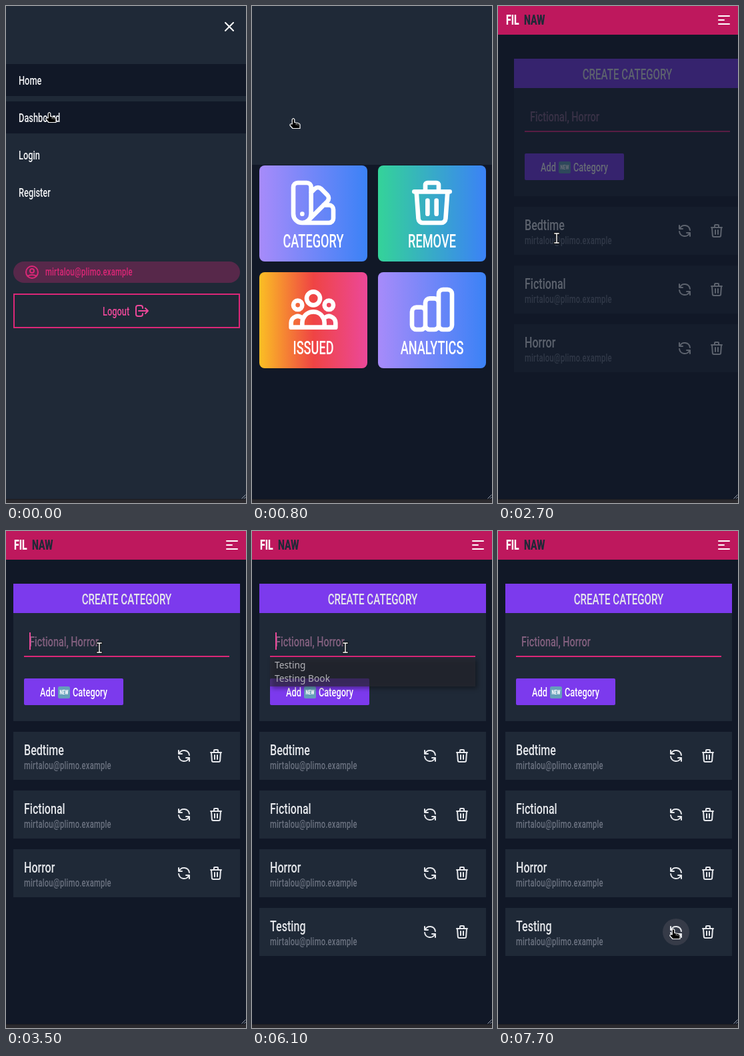
Animation of 360x745 px, one loop 8 s. Source, as an HTML page:

```html
<!DOCTYPE html>
<html lang="en">
<head>
<meta charset="utf-8">
<title>Library manager</title>
<style>
  html, body { margin: 0; height: 100%; overflow: hidden; background: #111827; }
  svg { display: block; width: 100vw; height: 100vh; }
  text { font-family: Roboto, "Liberation Sans", sans-serif; font-weight: 500; white-space: pre; }
  .icon { fill: none; stroke: currentColor; stroke-width: 2; stroke-linecap: round; stroke-linejoin: round; }
  .bold { font-weight: 900; }
  .mail { letter-spacing: .25px; }
  .popup text { font: 13.75px "Noto Sans", "Open Sans", sans-serif; fill: #b3b3b8; }
  .popup rect { filter: drop-shadow(3px 3px 3px rgba(0, 0, 0, .6)); }

  /* every part shares one 8 s clock; 1.25% = 100 ms */
  .anim { animation: 8s step-end infinite; }

  .menu { animation-name: menu; }
  @keyframes menu {
    0% { transform: translateY(0); }
    8.75% { transform: translateY(-90px); }
    10% { transform: translateY(-501px); }
    11.25%, 100% { transform: translateY(-750px); }
  }

  .dash { animation-name: dash; }
  @keyframes dash { 0% { opacity: 1; } 33.75%, 100% { opacity: 0; } }

  .page { animation-name: page; }
  @keyframes page {
    0% { opacity: 0; transform: translateX(13px); }
    33.75% { opacity: .36; transform: translateX(13px); }
    35% { opacity: .75; transform: translateX(-9px); }
    36.25% { opacity: 1; transform: translateX(-4px); }
    37.5% { opacity: 1; transform: translateX(1px); }
    38.75%, 100% { opacity: 1; transform: none; }
  }

  .hint { animation-name: hint; }
  @keyframes hint { 0% { opacity: 1; } 53.75% { opacity: 0; } 76.25%, 100% { opacity: 1; } }

  .typed { animation-name: typed; }
  @keyframes typed { 0% { opacity: 0; } 53.75% { opacity: 1; } 76.25%, 100% { opacity: 0; } }

  .typing { animation-name: typing; }
  @keyframes typing {
    0% { transform: translateX(0); }
    53.75% { transform: translateX(8.7px); }
    57.5% { transform: translateX(16.4px); }
    60% { transform: translateX(23.9px); }
    63.75% { transform: translateX(28.7px); }
    66.25% { transform: translateX(40.2px); }
    68.75% { transform: translateX(48.4px); }
    76.25%, 100% { transform: translateX(0); }
  }

  .caret { animation-name: caret; }
  @keyframes caret {
    0% { opacity: 0; } 43.75% { opacity: 1; } 73.75% { opacity: 0; }
    76.25% { opacity: 1; } 88.75%, 100% { opacity: 0; }
  }

  .popup { animation-name: popup; }
  @keyframes popup {
    0% { opacity: 0; } 53.75% { opacity: .6; } 55% { opacity: 1; } 78.75%, 100% { opacity: 0; }
  }
  .sheet { animation-name: sheet; }
  @keyframes sheet {
    0% { transform: scaleX(.47); fill-opacity: 1; }
    57.5% { transform: none; fill-opacity: 1; }
    76.25%, 100% { transform: none; fill-opacity: .6; }
  }

  .added { animation-name: added; }
  @keyframes added { 0% { opacity: 0; } 76.25%, 100% { opacity: 1; } }

  .hover { animation-name: hover; }
  @keyframes hover { 0% { opacity: 0; } 95% { opacity: .6; } 96.25%, 100% { opacity: 1; } }

  .cursor { animation-name: cursor; }
  @keyframes cursor {
    0% { transform: translate(65px, 160px); }
    1.25% { transform: translate(65px, 160px); animation-timing-function: steps(2, start); }
    3.75% { transform: translate(62px, 169px); }
    15% { transform: translate(62px, 169px); animation-timing-function: steps(3, start); }
    18.75% { transform: translate(51px, 225px); animation-timing-function: steps(4, start); }
    23.75% { transform: translate(93px, 363px); animation-timing-function: steps(2, start); }
    26.25% { transform: translate(88px, 346px); }
    33.75% { transform: translate(88px, 348px); }
    35% { transform: translate(88px, 348px); animation-timing-function: steps(8, start); }
    45% { transform: translate(140px, 175px); }
    78.75% { transform: translate(140px, 175px); animation-timing-function: steps(6, start); }
    86.25% { transform: translate(214px, 661px); }
    88.75% { transform: translate(214px, 661px); animation-timing-function: steps(7, start); }
    97.5%, 100% { transform: translate(263px, 597px); }
  }
  .hand { animation-name: hand; }
  @keyframes hand { 0% { opacity: 1; } 33.75% { opacity: 0; } 95%, 100% { opacity: 1; } }
  .beam { animation-name: beam; }
  @keyframes beam { 0% { opacity: 0; } 33.75% { opacity: 1; } 81.25%, 100% { opacity: 0; } }
  .arrow { animation-name: arrow; }
  @keyframes arrow { 0% { opacity: 0; } 81.25% { opacity: 1; } 95%, 100% { opacity: 0; } }
</style>
</head>
<body>
<svg id="stage" viewBox="0 0 360 745"></svg>
<script>
const MAIL = 'mirtalou@plimo.example';
const PINK = '#db2777', PANEL = '#1f2937', NIGHT = '#111827', VIOLET = '#7c3aed', PALE = '#e5e7eb';

const ICONS = {
  close: 'M6 18L18 6M6 6l12 12',
  menu: 'M4 6h16M4 12h8m-8 6h16',
  user: 'M5.1 17.8A14 14 0 0112 16c2.5 0 4.85.65 6.9 1.8M15 10a3 3 0 11-6 0 3 3 0 016 0zm6 2a9 9 0 11-18 0 9 9 0 0118 0z',
  exit: 'M17 16l4-4m0 0l-4-4m4 4H7m6 4v1a3 3 0 01-3 3H6a3 3 0 01-3-3V7a3 3 0 013-3h4a3 3 0 013 3v1',
  book: 'M12 6.25v13m0-13C10.8 5.5 9.25 5 7.5 5S4.2 5.5 3 6.25v13C4.2 18.5 5.75 18 7.5 18s3.3.5 4.5 1.25m0-13C13.2 5.5 14.75 5 16.5 5s3.3.5 4.5 1.25v13C19.8 18.5 18.25 18 16.5 18s-3.3.5-4.5 1.25',
  plus: 'M12 6v12M6 12h12',
  swatch: 'M7 21a4 4 0 01-4-4V5a2 2 0 012-2h4a2 2 0 012 2v12a4 4 0 01-4 4zm0 0h12a2 2 0 002-2v-4a2 2 0 00-2-2h-2.34M11 7.34l1.66-1.66a2 2 0 012.83 0l2.83 2.83a2 2 0 010 2.83l-8.49 8.49M7 17h.01',
  trash: 'M19 7l-.87 12.14A2 2 0 0116.14 21H7.86a2 2 0 01-2-1.86L5 7m5 4v6m4-6v6m1-10V4a1 1 0 00-1-1h-4a1 1 0 00-1 1v3M4 7h16',
  group: 'M17 20h5v-2a3 3 0 00-5.36-1.86M17 20H7m10 0v-2c0-.66-.13-1.28-.36-1.86M7 20H2v-2a3 3 0 015.36-1.86M7 20v-2c0-.66.13-1.28.36-1.86a5 5 0 019.28 0M15 7a3 3 0 11-6 0 3 3 0 016 0zm6 3a2 2 0 11-4 0 2 2 0 014 0zM7 10a2 2 0 11-4 0 2 2 0 014 0z',
  chart: 'M9 19v-6a2 2 0 00-2-2H5a2 2 0 00-2 2v6a2 2 0 002 2h2a2 2 0 002-2zm0 0V9a2 2 0 012-2h2a2 2 0 012 2v10m-6 0a2 2 0 002 2h2a2 2 0 002-2m0 0V5a2 2 0 012-2h2a2 2 0 012 2v14a2 2 0 01-2 2h-2a2 2 0 01-2-2z',
  refresh: 'M4 4v5h.58m15.36 2A8 8 0 004.58 9H9m11 11v-5h-.58a8 8 0 01-15.36-2m15.36 2H15'
};

const rect = (x, y, w, h, fill, more = '') =>
  `<rect x="${x}" y="${y}" width="${w}" height="${h}" fill="${fill}" ${more}/>`;
const icon = (name, x, y, color, size = 24) =>
  `<path class="icon" color="${color}" transform="translate(${x} ${y}) scale(${size / 24})" d="${ICONS[name]}"/>`;
const layer = (name, body) => `<g class="anim ${name}">${body}</g>`;

// condensed lettering: one shared squeeze for all body text, one for capitals
const label = (str, x, y, size, fill, cls = '', squeeze = .705, anchor = 'start') =>
  `<text class="${cls}" transform="translate(${x} ${y}) scale(${squeeze} 1)" font-size="${size}" fill="${fill}" text-anchor="${anchor}">${str}</text>`;
const caps = (str, x, y, size, fill) => label(str, x, y, size, fill, '', .665, 'middle');

const gradient = (id, ...stops) => `<linearGradient id="${id}">${stops.map((c, i) =>
  `<stop offset="${i / (stops.length - 1)}" stop-color="${c}"/>`).join('')}</linearGradient>`;

const defs = '<defs>' +
  gradient('sea', '#34d399', '#3b82f6') +
  gradient('fire', '#fbbf24', '#ef4444', '#ec4899') +
  gradient('dusk', '#a78bfa', '#3b82f6') + '</defs>';

const header = rect(0, 0, 360, 43, '#be185d') +
  label('FIL', 12, 28, 20, '#fff', 'bold') +
  label('NAW', 39, 28, 20, PANEL, 'bold') +
  icon('menu', 327, 9, '#fff');

const cards = [
  ['ALL BOOKS', 'book', 'sea'], ['ADD BOOK', 'plus', 'fire'],
  ['CATEGORY', 'swatch', 'dusk'], ['REMOVE', 'trash', 'sea'],
  ['ISSUED', 'group', 'fire'], ['ANALYTICS', 'chart', 'dusk']
].map(([name, pic, fill], i) => {
  const x = 11 + i % 2 * 178, y = 79 + (i >> 1) * 160;
  return rect(x, y, 162, 144, `url(#${fill})`, 'rx="8"') +
    icon(pic, x + 41, y + 16, '#fff', 80) +
    caps(name, x + 81, y + 123, 27.3, '#fff');
}).join('');

const row = (name, i, glow = '') => {
  const y = 301 + i * 88;
  return rect(11, y, 340, 72, PANEL) + glow +
    label(name, 27, y + 35, 22.8, PALE) +
    label(MAIL, 27, y + 56, 16, '#6b7280', 'mail') +
    icon('refresh', 255, y + 24, PALE) + icon('trash', 303, y + 24, PALE);
};

const form = rect(11, 79, 340, 44, VIOLET) +
  caps('CREATE CATEGORY', 181, 110, 22.8, PALE) +
  rect(11, 123, 340, 162, PANEL) +
  layer('typed', label('Testing', 35, 173, 20.5, '#f9a8d4') +
    layer('typing', rect(36, 150, 62, 32, PANEL))) +
  layer('hint', label('Fictional, Horror', 35, 173, 20.5, '#83607f')) +
  layer('caret', layer('typing', rect(35, 152, 2, 26, '#ec4899'))) +
  rect(27, 187, 308, 2, PINK) +
  rect(27, 221, 149, 40, VIOLET, 'rx="2"') +
  label('Add', 51, 248, 18.2, '#fff') +
  rect(78, 233, 18, 18, '#659fba', 'rx="2.5"') +
  label('NEW', 87, 245.2, 8.5, '#fff', 'bold', .705, 'middle') +
  label('Category', 100, 248, 18.2, '#fff');

const popup = layer('popup', `<g transform="translate(27 190)">
  <g class="anim sheet">${rect(0, 0, 308, 43, '#2a2b32')}</g>
  <text x="7" y="16">Testing</text><text x="7" y="36">Testing Book</text></g>`);

const glow = layer('hover', '<circle cx="267" cy="601" r="20" fill="#363b48"/>');
const page = ['Bedtime', 'Fictional', 'Horror'].map((name, i) => row(name, i)).join('') +
  layer('added', row('Testing', 3, glow)) + form + popup;

const menu = rect(0, -10, 360, 749, PANEL) +
  icon('close', 323, 19, '#fff') +
  rect(0, 87, 360, 48, NIGHT) + rect(0, 143, 360, 48, NIGHT) +
  ['Home', 'Dashboard', 'Login', 'Register'].map((name, i) =>
    label(name, 19, 117.5 + i * 56, 18.2, '#f3f4f6')).join('') +
  rect(11, 383, 340, 32, '#57284a', 'rx="16"') +
  icon('user', 27, 387, PINK) +
  label(MAIL, 59, 403.5, 16, PINK, 'mail') +
  rect(12, 432, 338, 50, 'none', `stroke="${PINK}" stroke-width="2"`) +
  label('Logout', 145, 463.5, 18.2, '#ec4899') +
  icon('exit', 192, 445, '#ec4899');

const frame = rect(0, 739, 360, 6, '#2b2a2e') + rect(0, 739, 360, 1, '#1b1b20') +
  '<path d="M353.5 738.5l6-6M357 738.5l2.5-2.5" stroke="#9ca3af" fill="none"/>';

const cursor =
  layer('hand', `<path d="M-1.8 1Q0-1.6 1.8 1V5.5L7 6.5Q10 7 10 9.5V14.5H-1L-5 10Q-5.5 7-1.8 8Z" fill="#000" stroke="#fff" stroke-width="1.2" stroke-linejoin="round"/>
    <path d="M4.3 7v2.5M7 7.6v2.4" stroke="#fff" stroke-width=".7"/>`) +
  layer('beam', [['#111', 3.4], ['#fff', 1.4]].map(([color, w]) =>
    `<path d="M-3-7H3M0-7V7M-3 7H3" fill="none" stroke="${color}" stroke-width="${w}" stroke-linecap="square"/>`).join('')) +
  layer('arrow', '<path d="M0 0V13L3 10.3 5.2 15.2 7.4 14.2 5.3 9.5H9.3Z" fill="#000" stroke="#fff"/>');

document.getElementById('stage').innerHTML = defs +
  rect(0, 0, 360, 745, NIGHT) +
  layer('dash', cards) + layer('page', page) +
  header + layer('menu', menu) + frame + layer('cursor', cursor);
</script>
</body>
</html>
```
